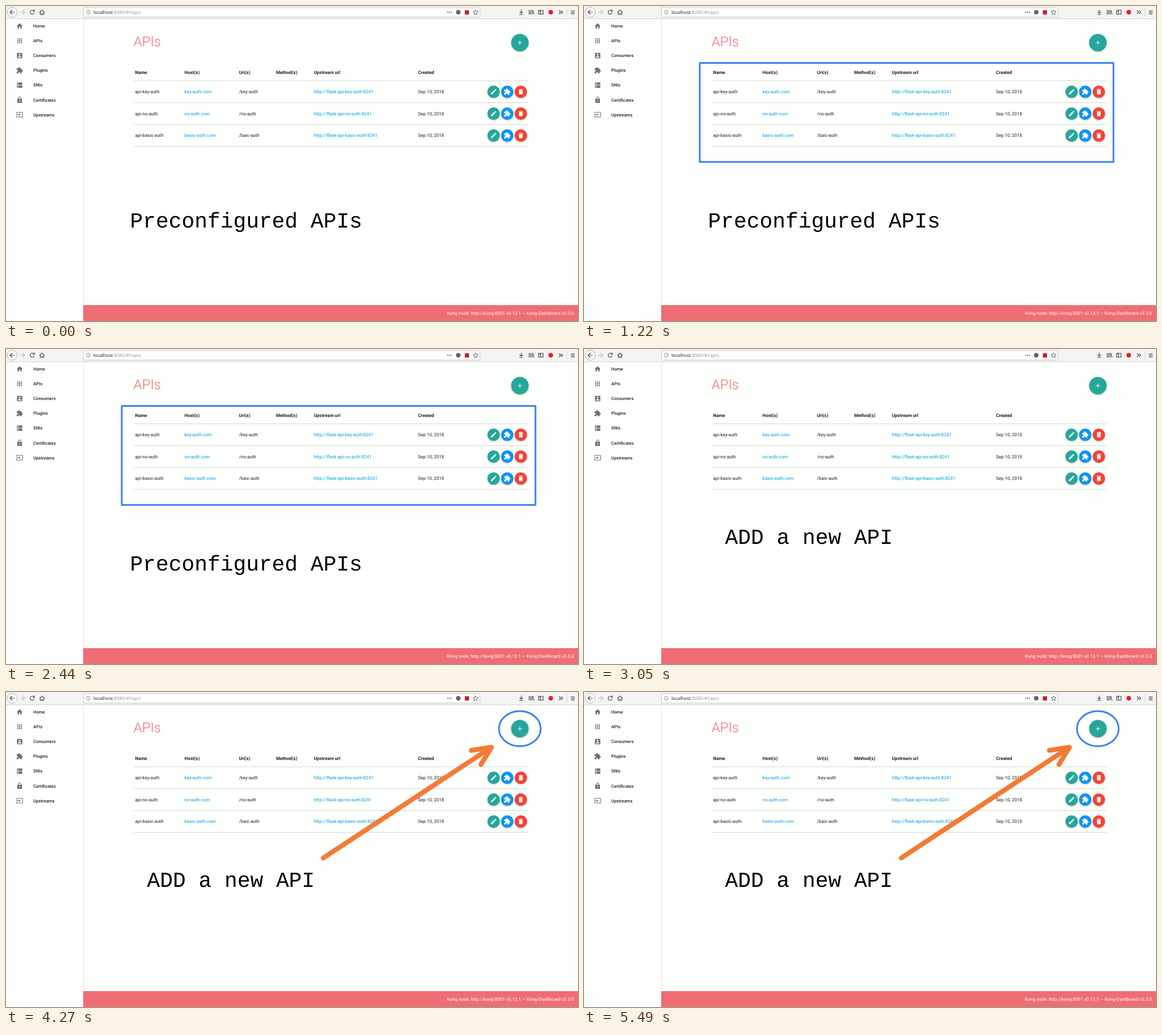
Recreate the animation shown at these times as an HTML page. Size 1008 by 556 pixels, loop 6100 ms.

```html
<!DOCTYPE html>
<html lang="en">
<head>
<meta charset="utf-8">
<title>API dashboard tour</title>
<style>
  html, body { margin: 0; width: 100%; height: 100%; overflow: hidden; background: #fcfffb; }
  svg { display: block; }
  text {
    font: 8px Roboto, sans-serif; fill: #212121; white-space: pre;
    font-kerning: none; text-rendering: geometricPrecision;
  }
  .head { font-weight: 700; }
  .link { fill: #039be5; }
  .nav { font-size: 7.7px; font-weight: 500; }
  .title { font-size: 24px; font-weight: 300; fill: #ef6d74; }
  .url { font: 8.1px "Noto Sans", sans-serif; fill: #222; }
  .caption { font: 37.9px "Courier New", "Liberation Mono", monospace; fill: #000; }
  .footer { fill: #fff; }
  .line { fill: none; stroke: #4a4a4a; stroke-width: 1.2; }
  .mark { fill: none; stroke-linecap: round; stroke-linejoin: round; }
  .raised { filter: drop-shadow(0 1px 1px rgba(0, 0, 0, .28)); }
</style>
</head>
<body>
<svg id="stage" width="1008" height="556" viewBox="0 0 1008 556"></svg>
<script>
const ORANGE = '#f47a38', BLUE = '#3f7fee', STEP = 610, STEPS = 10;

const icons = {
  home: 'M10 20v-6h4v6h5v-8h3L12 3 2 12h3v8z',
  apps: [4, 10, 16].map(y => [4, 10, 16].map(x => `M${x} ${y}h4v4h-4z`).join('')).join(''),
  person: 'M3 5v14c0 1.1.9 2 2 2h14c1.1 0 2-.9 2-2V5c0-1.1-.9-2-2-2H5c-1.1 0-2 .9-2 2zm12 4a3 3 0 1 1-6 0 3 3 0 0 1 6 0zm-9 8c0-2 4-3.1 6-3.1s6 1.1 6 3.1v1H6z',
  plugin: 'M20.5 11H19V7c0-1.1-.9-2-2-2h-4V3.5a2.5 2.5 0 0 0-5 0V5H4c-1.1 0-2 .9-2 2v3.8h1.5a2.7 2.7 0 0 1 0 5.4H2V20c0 1.1.9 2 2 2h3.8v-1.5a2.7 2.7 0 0 1 5.4 0V22H17c1.1 0 2-.9 2-2v-4h1.5a2.5 2.5 0 0 0 0-5z',
  server: [3, 13].map(y => `M4 ${y}h16q1 0 1 1v6q0 1-1 1H4q-1 0-1-1v-6q0-1 1-1zm3 2a2 2 0 1 0 0 4 2 2 0 0 0 0-4z`).join(''),
  lock: 'M18 8h-1V6A5 5 0 0 0 7 6v2H6c-1.1 0-2 .9-2 2v10c0 1.1.9 2 2 2h12c1.1 0 2-.9 2-2V10c0-1.1-.9-2-2-2zm-6 9a2 2 0 1 1 0-4 2 2 0 0 1 0 4zm3.1-9H8.9V6a3.1 3.1 0 0 1 6.2 0z',
  input: 'M21 3H3c-1.1 0-2 .9-2 2v4h2V5h18v14H3v-4H1v4c0 1.1.9 2 2 2h18c1.1 0 2-.9 2-2V5c0-1.1-.9-2-2-2zM11 16l4-4-4-4v3H1v2h10z',
  edit: 'M3 17.25V21h3.75L17.81 9.94l-3.75-3.75zM20.71 7.04c.39-.39.39-1.02 0-1.41l-2.34-2.34c-.39-.39-1.02-.39-1.41 0l-1.83 1.83 3.75 3.75z',
  trash: 'M6 19c0 1.1.9 2 2 2h8c1.1 0 2-.9 2-2V7H6zM19 4h-3.5l-1-1h-5l-1 1H5v2h14z',
  add: 'M19 13h-6v6h-2v-6H5v-2h6V5h2v6h6z'
};

const text = (x, y, cls, content) => `<text x="${x}" y="${y}" class="${cls}">${content}</text>`;
const rect = (x, y, w, h, fill, extra = '') =>
  `<rect x="${x}" y="${y}" width="${w}" height="${h}" fill="${fill}" ${extra}/>`;
const circle = (x, y, r, fill, extra = '') =>
  `<circle cx="${x}" cy="${y}" r="${r}" fill="${fill}" ${extra}/>`;
const line = (d, extra = '') => `<path class="line" d="${d}" ${extra}/>`;
const icon = (name, x, y, fill) =>
  `<path d="${icons[name]}" fill="${fill}" fill-rule="evenodd" transform="translate(${x} ${y}) scale(.525) translate(-12 -12)"/>`;
const button = (name, x, y, r, fill) =>
  circle(x, y, r, fill, 'class="raised"') + icon(name, x, y, '#fff');

function toolbar() {
  return rect(0, 0, 1008, 22, '#f5f4f2') + rect(0, 22, 1008, 1, '#d2d1cf') +
    circle(11, 11, 8.8, '#fbfbfa', 'stroke="#b0b0ae"') +
    line('M15.5 11H7M11 7l-4 4 4 4') +
    line('M24.5 11H33M29 7l4 4-4 4', 'style="stroke:#bdbdbb"') +
    line('M49 8.5A3.6 3.6 0 1 0 49.7 12M50 6.5v3h-3') +
    line('M59 11.5L63.5 7l4.5 4.5M60.5 10.5V15h6v-4.5M63.5 15v-3') +
    rect(136.5, 3, 698.5, 16.5, '#fff', 'rx="1.5" stroke="#c9c8c6"') +
    circle(145, 11, 3.6, 'none', 'stroke="#777" stroke-width=".8"') +
    line('M145 10.5v2.5M145 8.7v1', 'style="stroke:#777;stroke-width:.9"') +
    text(154, 14, 'url', 'localhost<tspan fill="#999">:8080/#!/apis</tspan>') +
    [778.5, 781.7, 784.9].map(x => circle(x, 11, 1, '#555')).join('') +
    circle(797, 11, 4, '#666') + rect(808.5, 7.5, 7.5, 7.5, '#c4202b') +
    line('M827.5 6.7l1.3 2.9 3.2.3-2.4 2.1.7 3.1-2.8-1.6-2.8 1.6.7-3.1-2.4-2.1 3.2-.3z', 'style="stroke-width:.9"') +
    line('M908 6.5v6M905 9.8l3 3 3-3M904.5 15h7') +
    line('M922 7v8M924.5 7v8M927 7v8M928.5 7.5l2 7.5') +
    line('M938.5 7.5h8v7h-8zM942 7.5v7M939.5 9.5h2') +
    circle(960, 11, 4, '#e0202f') +
    line('M974.5 8l3 3-3 3M978 8l3 3-3 3') +
    rect(988, 3, 1, 16, '#dcdbd9') + line('M995.5 8.5h6.5M995.5 11.2h6.5M995.5 13.9h6.5');
}

function sidebar() {
  const items = [['home', 'Home'], ['apps', 'APIs'], ['person', 'Consumers'], ['plugin', 'Plugins'],
    ['server', 'SNIs'], ['lock', 'Certificates'], ['input', 'Upstreams']];
  return rect(0, 23, 136, 533, '#fefefe') + rect(136, 23, 1, 505, '#e3e4e2') +
    items.map(([name, label], i) =>
      icon(name, 24, 35.3 + i * 26.1, '#6f6f6f') + text(48, 38 + i * 26.1, 'nav', label)).join('');
}

function table() {
  const columns = [227.5, 314.5, 410.5, 476, 542.5, 726];
  const heads = ['Name', 'Host(s)', 'Uri(s)', 'Method(s)', 'Upstream url', 'Created'];
  const rows = [['key', 'key'], ['no', 'no'], ['basic', 'baic']];
  let out = heads.map((h, i) => text(columns[i], 119.7, 'head', h)).join('');
  for (let i = 0; i < 4; i++) out += rect(225, 131.5 + i * 38.6, 696, 1, '#d3d5d2');
  rows.forEach(([kind, uri], i) => {
    const y = 151.3 + i * 38.6;
    const cells = [`api-${kind}-auth`, `${kind}-auth.com`, `/${uri}-auth`, '',
      `http://flask-api-${kind}-auth:8241`, 'Sep 10, 2018'];
    out += cells.map((c, j) => text(columns[j], y + 2.7, j === 1 || j === 4 ? 'link' : '', c)).join('');
    out += button('edit', 859.3, y, 10.8, '#26a69a') + button('plugin', 883.3, y, 10.8, '#1093f2') +
      button('trash', 907.3, y, 10.8, '#f44336');
  });
  return out;
}

const stage = document.getElementById('stage');
stage.innerHTML = rect(0, 0, 1008, 556, '#fcfffb') + toolbar() + sidebar() +
  text(224.7, 70.5, 'title', 'APIs') + button('add', 905.6, 64.7, 15.4, '#26a69a') + table() +
  rect(136, 528, 872, 28, '#ef6d74') +
  text(777, 545, 'footer', 'Kong node: http://kong:8001 v0.13.1 — Kong-Dashboard v3.3.0') +
  `<g id="listScene">${text(218.5, 391, 'caption', 'Preconfigured APIs')}
    <rect id="frame" class="mark" x="204" y="100.5" width="729" height="174.8" stroke-width="3"/></g>
  <g id="addScene">${text(248.5, 344, 'caption', 'ADD a new API')}
    <g id="pointer"><ellipse id="ring" class="mark" cx="905.5" cy="64.8" rx="36.8" ry="31" stroke-width="3"/>
    <path id="arrow" class="mark" d="M559 293L855.5 97.5M820 103l35.5-5.5L837 128" stroke-width="8.5"/></g></g>`;

const [listScene, addScene, frame, pointer, ring, arrow] =
  ['listScene', 'addScene', 'frame', 'pointer', 'ring', 'arrow'].map(id => document.getElementById(id));
const show = (el, on) => el.setAttribute('visibility', on ? 'inherit' : 'hidden');

// Each scene opens plain, then its marks swap colours every step.
function draw(now) {
  const step = Math.floor(now / STEP) % STEPS, beat = step % 5, odd = beat % 2 === 1;
  show(listScene, step < 5);
  show(addScene, step >= 5);
  show(frame, beat > 0);
  show(pointer, beat > 0);
  frame.setAttribute('stroke', odd ? ORANGE : BLUE);
  ring.setAttribute('stroke', odd ? ORANGE : BLUE);
  arrow.setAttribute('stroke', odd ? BLUE : ORANGE);
}

const start = performance.now();
function tick() {
  draw(performance.now() - start);
  requestAnimationFrame(tick);
}
tick();
</script>
</body>
</html>
```
